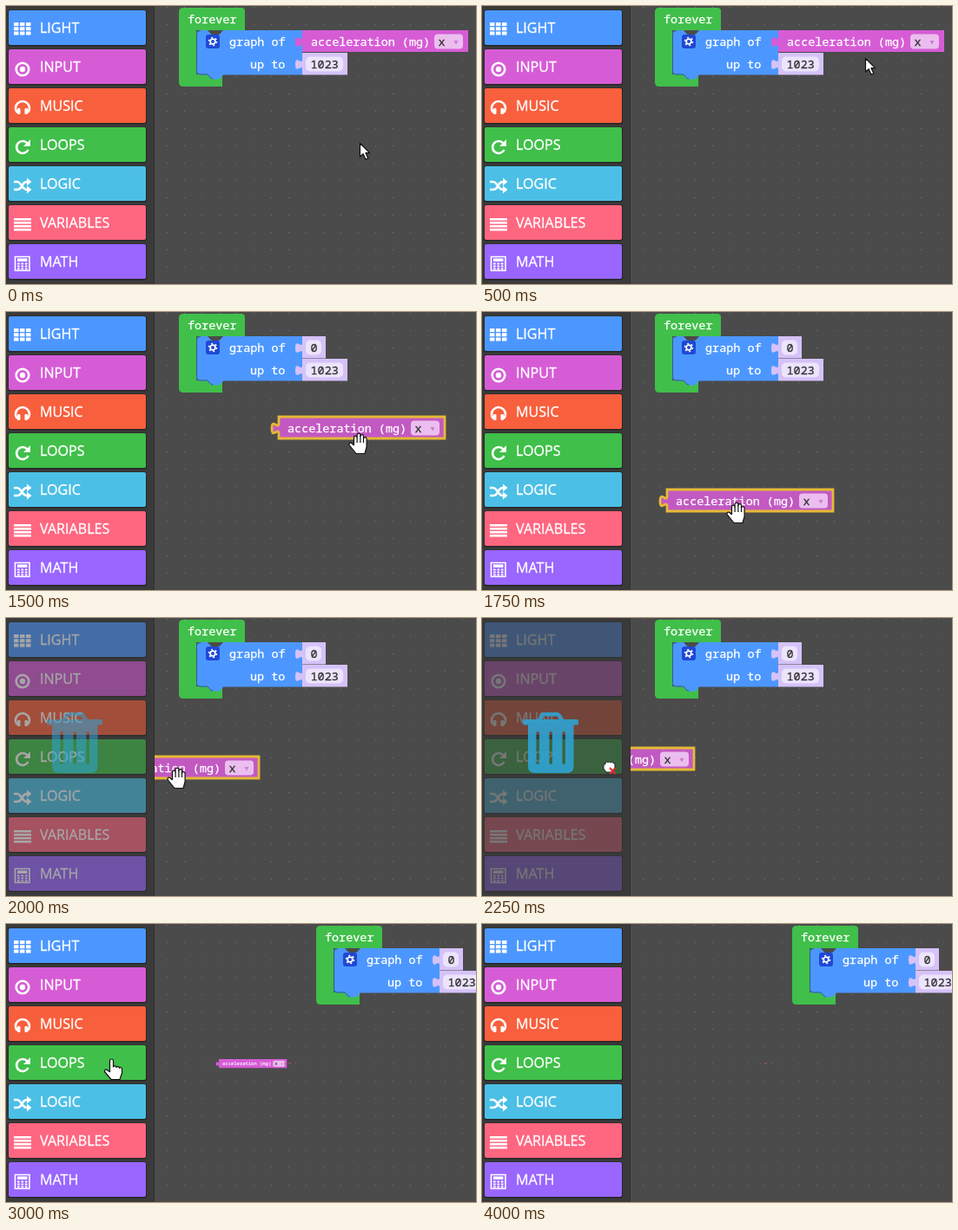
Animation of 541x321 px, one loop 4500 ms. Source, as an HTML page:

```html
<!DOCTYPE html>
<html lang="en">
<head>
<meta charset="utf-8">
<title>Removing a block</title>
<style>
  html, body { margin: 0; width: 100%; height: 100%; overflow: hidden; background: #4b4b4b; }
  svg { display: block; width: 541px; height: 321px; }
  text { white-space: pre; stroke-width: .3; }
  .menu text { font: 16.1px "Open Sans", sans-serif; fill: #fff; stroke: #fff; }
  .code { font: 13.45px "Noto Sans Mono", monospace; fill: #fff; stroke: #fff; }
  .dark { fill: #333; stroke: #333; }
  .line { fill: none; stroke: #fff; stroke-width: 2.6; }
</style>
</head>
<body>
<svg viewBox="0 0 541 321">
  <defs>
    <pattern id="grid" x="185" y="1" width="20" height="20" patternUnits="userSpaceOnUse">
      <rect width="1" height="1" fill="#747474"/>
    </pattern>
  </defs>
  <rect width="541" height="321" fill="#4b4b4b"/>
  <rect x="171" width="370" height="321" fill="url(#grid)"/>

  <g id="program">
    <path fill="#40bf4a" d="M204 2H271q4 0 4 4V28H219V79H249V93H204q-5 0-5-5V7q0-5 5-5z"/>
    <path fill="#4c97ff" d="M224 28H232l3 3.500q1 1.500 3 1.500H244q2 0 3-1.500l3-3.500H341V79.500H250l-3 3.500q-1 1.500-3 1.500H238q-2 0-3-1.500l-3-3.500H224q-5 0-5-5V33q0-5 5-5z"/>
    <path d="M224 28.500q-4.500 0-4.500 4.500V74.500q0 4.500 4.500 4.500H232l3 3.500q1 1.500 3 1.500" fill="none" stroke="#2c5f80"/>
    <g transform="translate(238 41)">
      <rect x="-8" y="-8" width="16" height="16" rx="3" fill="#1f48d4"/>
      <circle r="2.900" fill="none" stroke="#fff" stroke-width="1.800"/>
      <circle r="4.500" fill="none" stroke="#fff" stroke-width="1.600" stroke-dasharray="1.900 2.812"/>
    </g>
    <g class="code">
      <text x="209" y="20">forever</text>
      <text x="257" y="46">graph of</text>
      <text x="281" y="72">up to</text>
    </g>
    <g id="values"></g>
  </g>

  <g id="sensor"></g>

  <rect width="171" height="321" fill="#3a3a3a"/>
  <path d="M170.500 0V321" stroke="#303030"/>
  <g id="menu" class="menu"></g>

  <g id="trash" fill="#2ea5d6">
    <path fill="none" stroke="#2ea5d6" stroke-width="4.500" d="M65.500 119l3.500-6q1-1.700 3-1.700H86q2 0 3 1.700l3.500 6"/>
    <rect x="47" y="117" width="64" height="6.500" rx="2"/>
    <path fill-rule="evenodd" d="M53 122H105.500V171q0 8-8 8H61q-8 0-8-8zM62.500 133V167q0 2 1.700 2t1.700-2V133q0-2-1.700-2t-1.700 2zM77.500 133V167q0 2 1.700 2t1.700-2V133q0-2-1.700-2t-1.700 2zM92.500 133V167q0 2 1.700 2t1.700-2V133q0-2-1.700-2t-1.700 2z"/>
  </g>

  <g id="sparks" fill="#b0565c">
    <rect x="320" y="161" width="1" height="1"/>
    <rect x="326" y="160" width="2" height="1"/>
    <rect x="333" y="160" width="1" height="1"/>
  </g>

  <g id="cursors" fill="#fff" stroke="#111" stroke-width="1.200" stroke-linejoin="round">
    <path id="arrow" d="M.5 .5V16l3.600-3.300L7 19l2.800-1.200L7 11.700H11.500z"/>
    <path id="point" d="M7.500 16V3a2 2 0 0 1 4 0V10a1.900 1.900 0 0 1 3.600 .6a1.800 1.800 0 0 1 3.400 .7a1.700 1.700 0 0 1 3 1.200V17L19 24.500H9L1.500 15.500q0-3.500 3-2L7.500 16"/>
    <g id="palm">
      <path d="M6.500 15V6a1.800 1.800 0 0 1 3.600 0V3a1.900 1.900 0 0 1 3.800 0V4.500a1.800 1.800 0 0 1 3.600 0V7.500a1.800 1.800 0 0 1 3.600 0V17L19 24.500H9L1 14.500q0-3.500 3-2L6.500 15"/>
      <path fill="none" d="M10.100 6V12M13.900 4V12M17.500 6V12"/>
    </g>
    <g id="fist">
      <path d="M2 6q1-2 2-1V3q2-2 3 0q1.500-2 3 0q2-1.500 3 .5q2-.5 2 2V10L13 14H5L2 10z" stroke-width=".9"/>
      <path d="M9 9l6.500 7M15.500 9L9 16" stroke="#e03030" stroke-width="2"/>
    </g>
  </g>
</svg>

<script>
const el = id => document.getElementById(id);

const valueShape = (width, height) =>
  `M0 0H${width}V${height}H0V19.500c0-8-8 6.400-8-6s8 2 8-6z`;

const numberBlock = (id, y, width, label) => `
  <g id="${id}" transform="translate(341 ${y})">
    <path d="${valueShape(width, 25.5)}" fill="#d5c2f8"/>
    <rect x="4" y="4.500" width="${width - 9}" height="17" rx="5" fill="#ece4fc"/>
    <text class="code dark" x="9.500" y="18">${label}</text>
  </g>`;
el("values").innerHTML = numberBlock("zero", 28, 27, "0") + numberBlock("limit", 54, 52, "1023");

el("sensor").innerHTML = `
  <path id="outline" d="${valueShape(191, 25)}" fill="#d65cd6" stroke="#fc3"/>
  <text class="code" x="10" y="18">acceleration (mg)</text>
  <rect x="152" y="4.500" width="33" height="17" rx="4" fill="#ebbeef"/>
  <text class="code dark" x="156.500" y="18">x</text>
  <path d="M174.500 12h5l-2.500 4.500z" fill="#cf78d2"/>`;

// Icons are drawn around the centre of a 20 px square.
const tiles = (size, step, x, y) => Array.from({ length: 9 }, (_, i) =>
  `<rect x="${x + i % 3 * step[0]}" y="${y + Math.floor(i / 3) * step[1]}" width="${size[0]}" height="${size[1]}" rx=".6"/>`).join("");
const menuItems = [
  ["LIGHT", "#4c97ff", tiles([5.5, 4], [7, 5.3], -10, -7)],
  ["INPUT", "#d65cd6", `<circle cy="2" r="7.300" class="line"/><circle cy="2" r="3.200"/>`],
  ["MUSIC", "#f85f3d", `<path class="line" d="M-6 7q-2-2-2-5a8 8 0 0 1 16 0q0 3-2 5"/><rect x="-6" y="2" width="3.500" height="7" rx="1"/><rect x="2.500" y="2" width="3.500" height="7" rx="1"/>`],
  ["LOOPS", "#40bf4a", `<path class="line" d="M5.500 -2.500A7 7 0 1 0 6.500 5"/><path d="M9-7V1H1z"/>`],
  ["LOGIC", "#4cbfe6", `<path class="line" d="M-10-3h4q2 0 4 3l3 4q2 2 4 2h2M-10 6h4q2 0 4-2l3-5q2-2 4-2h2"/><path d="M5-7.500l5.500 4.500L5 1.500zM5 1.500L10.500 6 5 10.500z"/>`],
  ["VARIABLES", "#ff6680", [-6, -2, 2, 6].map(y => `<rect x="-10" y="${y}" width="20" height="2.600"/>`).join("")],
  ["MATH", "#9966ff", `<path class="line" style="stroke-width:1.600" d="M-8.500-6.500H8V9.500H-8.500z"/><rect x="-6" y="-4.500" width="11.500" height="3.500"/>${tiles([2.8, 2], [4.4, 3], -6, .5)}`],
];
el("menu").innerHTML = menuItems.map(([label, color, icon], i) => `
  <g transform="translate(0 ${5 + i * 45})">
    <rect x="2" y="-.500" width="160" height="42" rx="3" fill="#262626"/>
    <rect x="3" width="158" height="40" rx="2" fill="${color}"/>
    <g fill="#fff" transform="translate(19 21)">${icon}</g>
    <text x="39" y="26">${label}</text>
  </g>`).join("");

const STEP = 250, LOOP = 4500;
// Cursor by step: shape, x, y
const cursorPath = [
  ["arrow", 407, 158], ["arrow", 427, 84], ["arrow", 441, 60], ["point", 427, 41],
  ["point", 427, 41], ["palm", 425, 75], ["palm", 394, 139], ["palm", 281, 219],
  ["palm", 185, 172], ["fist", 138, 164], ["fist", 122, 158], ["fist", 114, 154],
  ["point", 112, 155], ["point", 112, 155], ["point", 112, 155], ["point", 113, 159],
];
const DRAG_START = 5, FADE_START = 8, DROP = 12;
const dragPath = [[0, 34], [-27, 93], [-128, 177], [-241, 132], [-288, 122], [-304, 116], [-313, 113]];
const menuFade = [.55, .3, .2, .17];
const trashFade = [.55, .88, 1, 1];

const show = (id, visible) => el(id).style.display = visible ? "" : "none";
const place = (id, x, y, scale = 1) =>
  el(id).setAttribute("transform", `translate(${x} ${y}) scale(${scale})`);

function draw(time) {
  const step = Math.floor(time % LOOP / STEP);
  const dragging = step >= DRAG_START && step < DROP;
  const fading = step >= FADE_START && step < DROP;

  place("program", step >= DROP ? 158 : 0, 0);
  show("zero", step >= DRAG_START);

  const [dx, dy] = dragging ? dragPath[step - DRAG_START] : [0, 0];
  if (step === DROP) place("sensor", 245, 156, .41);
  else place("sensor", 341 + dx, 28 + dy);
  show("sensor", step <= DROP);
  el("outline").style.opacity = dragging ? .86 : 1;
  el("outline").setAttribute("stroke-width", step >= 4 && step < DROP ? 2.8 : 0);
  show("sparks", step >= DROP);

  el("menu").style.opacity = fading ? menuFade[step - FADE_START] : 1;
  el("trash").style.opacity = fading ? trashFade[step - FADE_START] : 0;

  const [shape, x, y] = cursorPath[step] || [];
  for (const id of ["arrow", "point", "palm", "fist"]) show(id, id === shape);
  if (shape) place(shape, x, y);
}

const start = performance.now();
function tick() {
  draw(performance.now() - start);
  requestAnimationFrame(tick);
}
tick();
</script>
</body>
</html>
```
